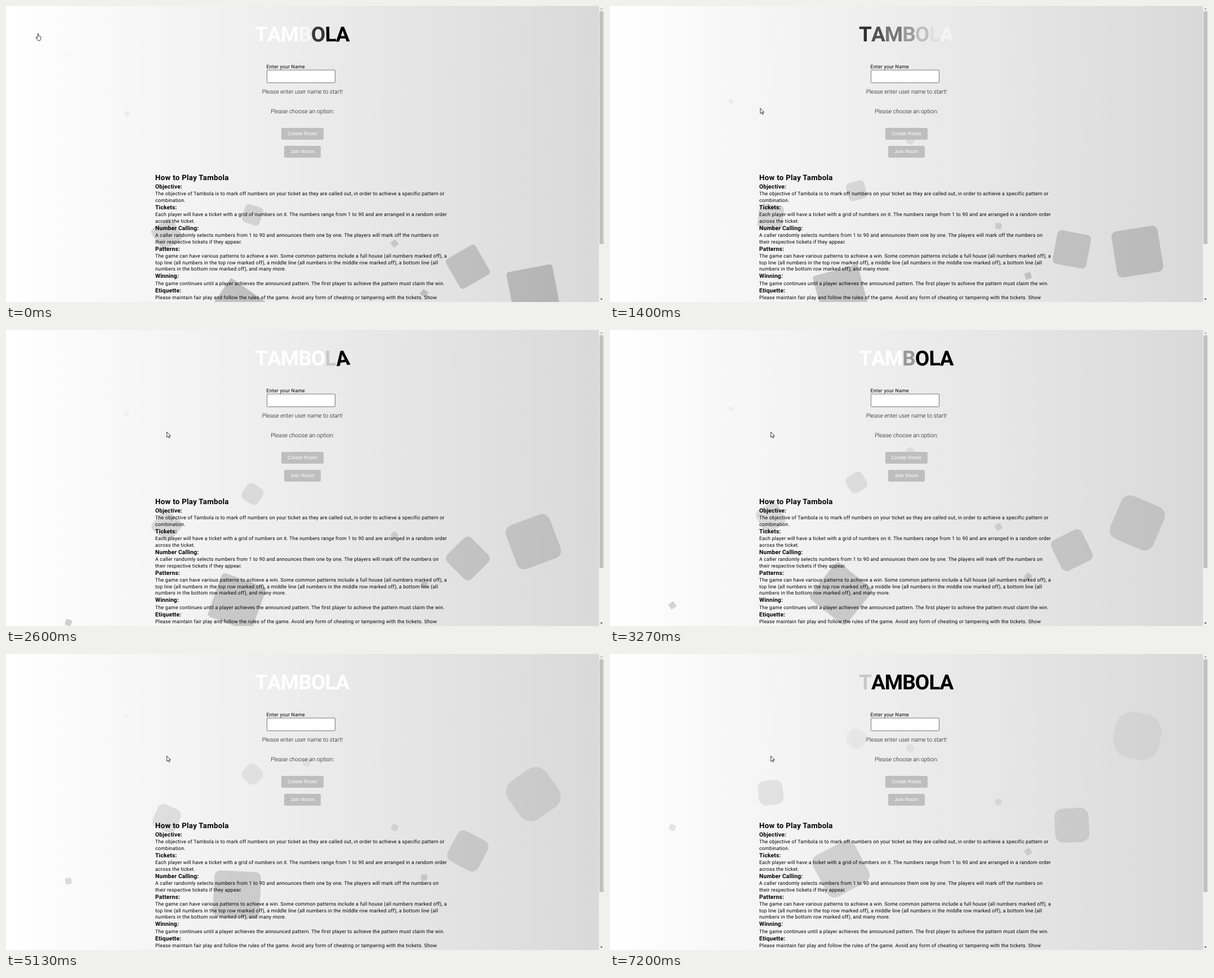
Animation, 1062 px wide and 527 px high, one loop 7.27 s. Source, as an HTML page with a canvas:

```html
<!DOCTYPE html>
<html lang="en">
<head>
<meta charset="utf-8">
<title>Tambola</title>
<style>
  html, body { margin: 0; width: 100%; height: 100%; overflow: hidden; background: #fff; }
  canvas, svg { position: absolute; left: 0; top: 0; width: 1062px; height: 527px; }
  text { font-family: Roboto, sans-serif; text-rendering: geometricPrecision; fill: #000; white-space: pre; }
  .body { font-size: 8.85px; letter-spacing: .0227em; }
  .head { font-size: 13.27px; font-weight: 700; letter-spacing: .0227em; }
  .sub { font-size: 10.35px; font-weight: 700; letter-spacing: .015em; }
  .note { font-size: 10.3px; font-weight: 300; text-anchor: middle; fill: #111; }
  .button { font-family: "Liberation Sans", Arial, sans-serif; font-size: 8.85px; text-anchor: middle; fill: #fff; }
  .title { font-size: 37px; font-weight: 700; }
</style>
</head>
<body>
<canvas id="stage" width="1062" height="527"></canvas>
<svg id="page" viewBox="0 0 1062 527">
  <rect x="463.5" y="114" width="121" height="22.7" rx="1" fill="#fff" stroke="#767676"/>
  <g fill="#bebebe">
    <rect x="489" y="217" width="75" height="21" rx="2.2"/>
    <rect x="494" y="249" width="65" height="21" rx="2.2"/>
  </g>
  <g id="copy"></g>
  <g id="title"></g>
  <rect x="1053" width="9" height="527" fill="#f1f1f1"/>
  <rect x="1054" y="9.4" width="7" height="414.6" fill="#c1c1c1"/>
  <path d="M1055.2 6.2h4.6l-2.3-2.6z" fill="#a3a3a3"/>
  <path d="M1055.2 520.8h4.6l-2.3 2.6z" fill="#505050"/>
  <g fill="#fff" stroke="#222" stroke-width=".9" stroke-linejoin="round">
    <path id="hand" d="M56 57V50.2q0-1.2 1-1.2t1 1.2V53.3l3 .7q1.2.4 1.1 1.7l-.5 3-.9 2.6h-4.2l-1.7-2.6-1.7-2.4q-.3-1 .8-1z"/>
    <path id="arrow" d="M0 0V9.6L2.2 7.6 3.7 10.9 5.2 10.2 3.8 7.1H6.7z"/>
  </g>
</svg>
<script>
const LOOP = 7270, FPS = 15;
const SCALE = 1062 / 1920, PAGE_W = 1053, PAGE_H = 527;
const AGE = 133.21; // seconds the floating squares have already run
const WAVE = 3.1;   // seconds between light waves through the title

const $ = id => document.getElementById(id);
const ctx = $("stage").getContext("2d");

// Smooth step from 0 to 1 between two times
function ease(t, from, to) {
  const u = Math.max(0, Math.min(1, (t - from) / (to - from)));
  return u * u * (3 - 2 * u);
}

function addText(parent, cls, x, y, str) {
  const el = document.createElementNS("http://www.w3.org/2000/svg", "text");
  el.setAttribute("class", cls);
  el.setAttribute("x", x);
  el.setAttribute("y", y);
  el.textContent = str;
  $(parent).append(el);
  return el;
}

addText("copy", "body", 462.5, 111.2, "Enter your Name");
addText("copy", "note", 526.4, 156.3, "Please enter user name to start!");
addText("copy", "note", 526.4, 191.3, "Please choose an option:");
addText("copy", "button", 526.4, 230.1, "Create Room");
addText("copy", "button", 526.4, 262.1, "Join Room");
addText("copy", "head", 265, 309.8, "How to Play Tambola");

const rules = [
  ["Objective:",
    "The objective of Tambola is to mark off numbers on your ticket as they are called out, in order to achieve a specific pattern or",
    "combination."],
  ["Tickets:",
    "Each player will have a ticket with a grid of numbers on it. The numbers range from 1 to 90 and are arranged in a random order",
    "across the ticket."],
  ["Number Calling:",
    "A caller randomly selects numbers from 1 to 90 and announces them one by one. The players will mark off the numbers on",
    "their respective tickets if they appear."],
  ["Patterns:",
    "The game can have various patterns to achieve a win. Some common patterns include a full house (all numbers marked off), a",
    "top line (all numbers in the top row marked off), a middle line (all numbers in the middle row marked off), a bottom line (all",
    "numbers in the bottom row marked off), and many more."],
  ["Winning:",
    "The game continues until a player achieves the announced pattern. The first player to achieve the pattern must claim the win."],
  ["Etiquette:",
    "Please maintain fair play and follow the rules of the game. Avoid any form of cheating or tampering with the tickets. Show"]
];
let lineY = 324.7;
for (const [heading, ...lines] of rules) {
  addText("copy", "sub", 265, lineY, heading);
  lines.forEach((line, i) => addText("copy", "body", 265, lineY + 12.3 + i * 11.7, line));
  lineY += 13.6 + lines.length * 11.7;
}

// size, left (share of width), delay, duration
const squares = [
  [80, .25], [20, .10, 2, 12], [20, .70, 4], [60, .40, 0, 18], [20, .65],
  [110, .75, 3], [150, .35, 7], [25, .50, 15, 45], [15, .20, 2, 35], [150, .85, 0, 11]
];

// Each square rises 1000 px, turns twice, rounds off and fades
function drawSquare([size, left, delay = 0, duration = 25], sec) {
  const p = (AGE + sec - delay) % duration / duration;
  const side = size * SCALE;
  ctx.save();
  ctx.translate(left * PAGE_W + side / 2, PAGE_H + (150 - 1000 * p) * SCALE - side / 2);
  ctx.rotate(p * 4 * Math.PI);
  ctx.fillStyle = `rgba(0,0,0,${.2 * (1 - p)})`;
  ctx.beginPath();
  ctx.roundRect(-side / 2, -side / 2, side, side, p * side / 2);
  ctx.fill();
  ctx.restore();
}

let letterX = 442;
const letters = [..."TAMBOLA"].map(ch => {
  const el = addText("title", "title", letterX, 63.2, ch);
  const width = el.getComputedTextLength();
  const middle = letterX + width / 2;
  letterX += width - 1;
  return { el, middle };
});

// Light comes on almost at once, then goes out letter by letter from the right
function glow(t, k) {
  const rise = 1.25 + .04 * k, fall = 2.4 + .3 * k;
  return ease(t, rise - .2, rise + .2) * (1 - ease(t, fall - .25, fall + .25));
}

function drawLetter({ el, middle }, i, sec) {
  const t = sec % WAVE, k = letters.length - 1 - i;
  const light = Math.max(glow(t, k), glow(t + WAVE, k));
  const shake = ease(t, 2.3, 2.6) - ease(t, 3, WAVE) + (1 - ease(t, 0, .3)) * ease(t + .1, 0, .1) * (t < .3) * .5;
  const tilt = -7 * Math.cos((t - 2.6) * 4 * Math.PI) * shake * (1 - light);
  const grey = Math.round(255 * light);
  el.style.fill = `rgb(${grey},${grey},${grey})`;
  el.setAttribute("transform", `rotate(${tilt} ${middle} 50)`);
}

function drawPointer(sec) {
  const moving = sec > .49;
  $("hand").style.display = moving ? "none" : "";
  $("arrow").style.display = moving ? "" : "none";
  const a = ease(sec, .49, 1.39), b = ease(sec, 1.5, 1.95);
  const x = 57 + 210 * a + 18.7 * b;
  const y = 49 + 133 * a - .5 * b;
  $("arrow").setAttribute("transform", `translate(${x} ${y})`);
}

const backdrop = ctx.createLinearGradient(0, 0, PAGE_W, 0);
backdrop.addColorStop(0, "#fff");
backdrop.addColorStop(1, "#d9d9d9");

function render(ms) {
  // The picture advances in steps of 1/15 s
  const sec = Math.floor(ms % LOOP * FPS / 1000 + .06) / FPS;
  ctx.fillStyle = backdrop;
  ctx.fillRect(0, 0, PAGE_W, PAGE_H);
  squares.forEach(square => drawSquare(square, sec));
  letters.forEach((letter, i) => drawLetter(letter, i, sec));
  drawPointer(sec);
}

const start = performance.now();
function tick() {
  render(performance.now() - start);
  requestAnimationFrame(tick);
}
tick();
</script>
</body>
</html>
```
